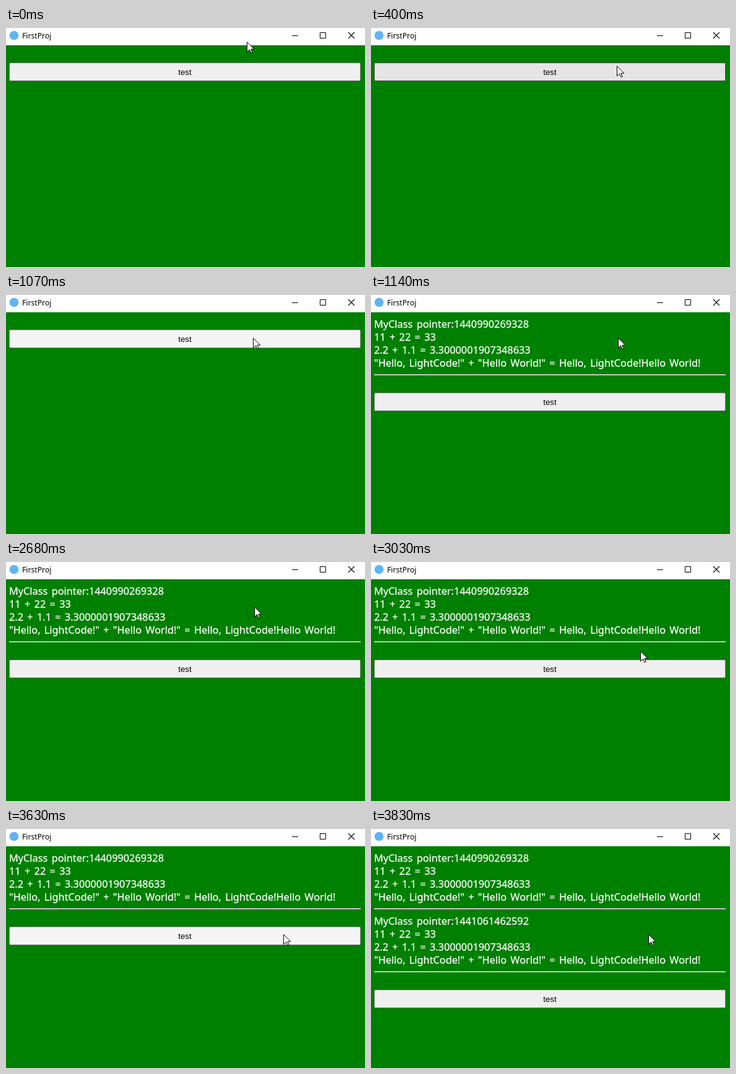
An HTML page for the animation above (4.97 s loop, 580 px wide and 387 px high).

```html
<!DOCTYPE html>
<html lang="en">
<head>
<meta charset="utf-8">
<title>FirstProj</title>
<style>
  html, body { margin: 0; width: 100%; height: 100%; overflow: hidden; background: green; }
  svg { display: block; width: 580px; height: 387px; }
  .title { font: 12.2px "Noto Sans", sans-serif; }
  .log { font: 16.3px "Noto Sans", sans-serif; word-spacing: 2.1px; fill: #fff; }
  .log text { stroke: #fff; stroke-width: .25px; }
  .caption { font: 13.333px "Liberation Sans", Arial, sans-serif; text-anchor: middle; }
  .controls { fill: none; stroke: #000; }
  #button rect { fill: #efefef; stroke: #767676; }
  #button.hover rect { fill: #e5e5e5; stroke: #4f4f4f; }
  #button.active rect { fill: #f5f5f5; stroke: #8d8d8d; }
</style>
</head>
<body>
<svg viewBox="0 0 580 387">
  <rect width="580" height="387" fill="green"/>
  <rect width="580" height="28" fill="#fff"/>
  <circle cx="13" cy="12" r="7.3" fill="#5fb4f8"/>
  <text class="title" x="26" y="17">FirstProj</text>
  <g class="controls">
    <path d="M462 12.5h10M507.5 7.5h9v9h-9z"/>
    <path d="M553 7l10 10m0-10l-10 10" stroke-width="1.1"/>
  </g>
  <g id="output"></g>
  <g id="button">
    <rect x="5.5" y="56.5" width="567" height="29" rx="1.5"/>
    <text class="caption" x="289" y="76">test</text>
  </g>
  <path id="cursor" fill="#fff" stroke="#000"
        d="M.5 .8V16.8L4.4 13L6.9 18.5L9.2 17.5L6.8 12.2H11.8Z"/>
</svg>
<script>
const LOOP = 4970;
const STEP_MS = 68.7;
const STEPS = 9;
const BUTTON_TOP = 56;
const BLOCK_HEIGHT = 102;
const output = document.getElementById('output');
const button = document.getElementById('button');
const cursor = document.getElementById('cursor');

const easeOut = u => 1 - (1 - u) ** 2.25;
const easeInOut = u => u * u * (3 - 2 * u);

// Each round moves the cursor to the button, then clicks it.
const home = { x: 389, y: 22 };
const rounds = [
  { start: 120, press: 870, release: 1140, x: 399, y: 69, ease: easeOut, pointer: '1440990269328' },
  { start: 2680, press: 3630, release: 3830, x: 448, y: 170, ease: easeInOut, pointer: '1441061462592' }
];

function resultBlock({ pointer }, index) {
  const lines = [
    `MyClass pointer:${pointer}`,
    '11 + 22 = 33',
    '2.2 + 1.1 = 3.3000001907348633',
    '"Hello, LightCode!" + "Hello World!" = Hello, LightCode!Hello World!'
  ];
  const texts = lines.map((line, i) => `<text x="5" y="${53 + 21 * i}">${line}</text>`);
  return `<g class="log" transform="translate(0 ${index * BLOCK_HEIGHT})">${texts.join('')}
    <rect x="5" y="128" width="568" height="1" fill="#9a9a9a"/>
    <rect x="5" y="129" width="568" height="1" fill="#eee"/></g>`;
}

output.innerHTML = rounds.map(resultBlock).join('');

const move = (node, x, y) => node.setAttribute('transform', `translate(${x} ${y})`);

// The pointer is sampled at a fixed rate, so it moves in discrete steps.
function cursorAt(time) {
  return rounds.reduce((from, { start, x, y, ease }) => {
    const step = Math.floor((time - start) / STEP_MS) + 1;
    const progress = ease(Math.max(0, Math.min(1, step / STEPS)));
    return { x: from.x + (x - from.x) * progress, y: from.y + (y - from.y) * progress };
  }, home);
}

function buttonState(time, cursorY, top) {
  if (rounds.some(({ press, release }) => time >= press && time < release)) return 'active';
  return cursorY >= top ? 'hover' : '';
}

function draw() {
  const time = performance.now() % LOOP;
  const { x, y } = cursorAt(time);
  const count = rounds.filter(({ release }) => time >= release).length;
  const shift = count * BLOCK_HEIGHT;
  move(cursor, Math.round(x), Math.round(y));
  move(button, 0, shift);
  button.setAttribute('class', buttonState(time, y, BUTTON_TOP + shift));
  [...output.children].forEach((block, i) => {
    block.setAttribute('visibility', i < count ? 'visible' : 'hidden');
  });
  requestAnimationFrame(draw);
}
draw();
</script>
</body>
</html>
```
